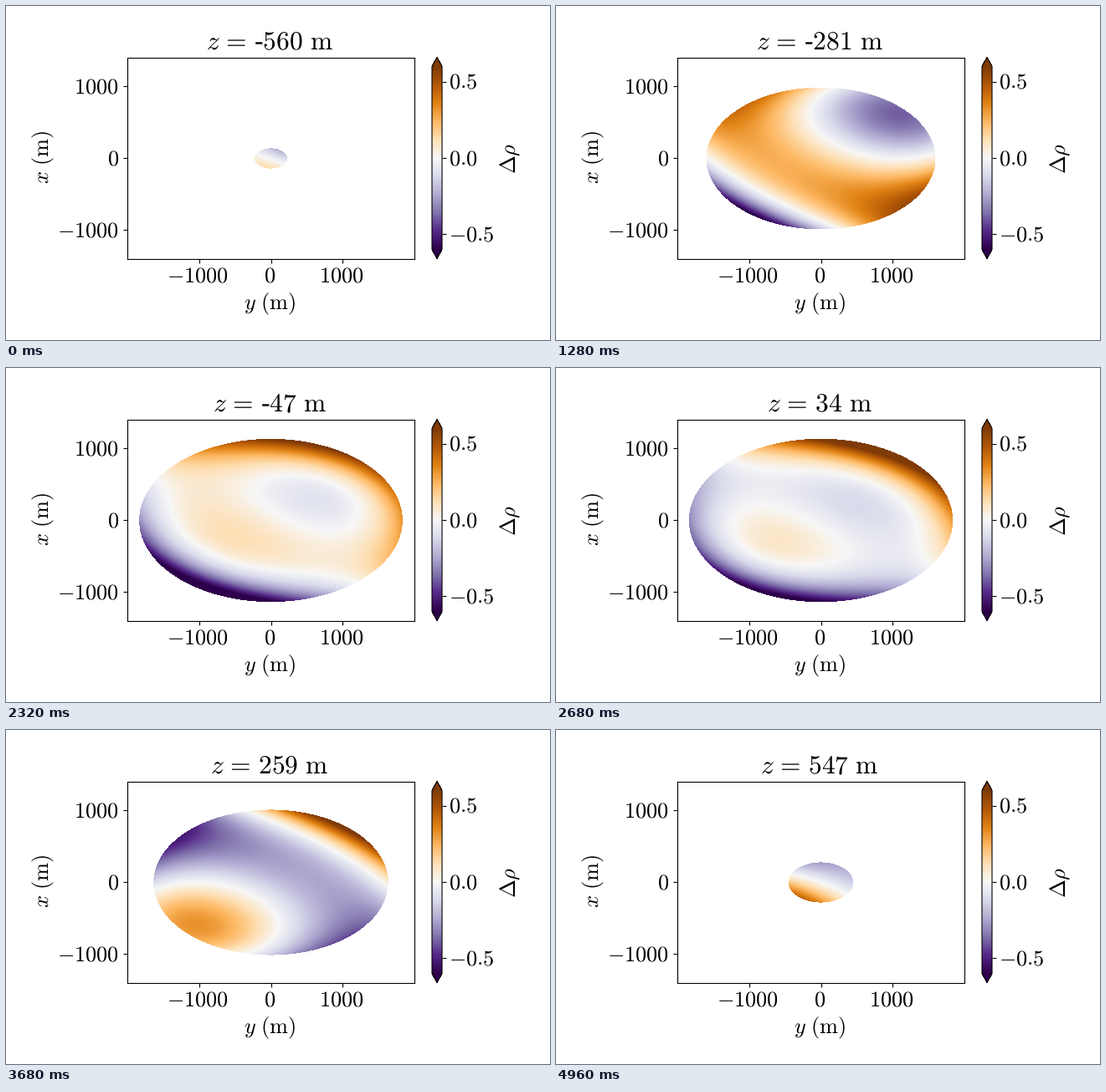
A matplotlib script for the animation above (5 s loop, 650 px wide and 400 px high).

```python
import numpy as np
import matplotlib.pyplot as plt
from matplotlib.animation import FuncAnimation

W, H, DPI = 650, 400, 100
FRAMES, INTERVAL = 125, 40
SMALL, LARGE = 18.95, 22.7
AX_BOX = (145.2, 61.8, 343, 241)      # left, top, width, height in pixels
CB_BOX = (509, 61.5, 12, 241)
Y_MAX, X_MAX, V_MAX = 2000, 1400, 0.6
SEMI_Y, SEMI_X, SEMI_Z = 1842, 1138, 564.3
CX, CY = 317, 182                     # stage position of the body's centre
PX_Y, PX_X = 343 / 4000, 241 / 2800   # pixels per metre

plt.rcParams.update({
    "mathtext.fontset": "cm",
    "font.family": "Liberation Serif",
    "text.hinting": "none",
    "axes.linewidth": 0.8,
})


def anomaly(y, x, z):
    """Odd cubic density anomaly in coordinates scaled by the semi-axes."""
    return (y * (-0.28 + 0.60 * y**2 + 0.85 * x**2 - 0.48 * z**2)
            + x * (-0.30 + 0.68 * y**2 + 0.95 * x**2 - 1.05 * z**2)
            + z * (-0.46 + 0.38 * y**2 + 0.58 * x**2 + 0.49 * z**2)
            + 2.65 * x * y * z)


NY, NX = AX_BOX[2:]
ys = ((np.arange(NY) + 0.5) / NY * 2 - 1) * Y_MAX / SEMI_Y
xs = (1 - (np.arange(NX) + 0.5) / NX * 2) * X_MAX / SEMI_X
GRID_Y, GRID_X = np.meshgrid(ys, xs)


def density(depth):
    z = depth / SEMI_Z
    inside = GRID_Y**2 + GRID_X**2 + z**2 <= 1
    return np.where(inside, anomaly(GRID_Y, GRID_X, z), np.nan)


def depth_at(i):
    return -569 + 9 * max(i, 1)


def title_text(depth):
    # the hyphen stays outside math mode so that it is not set as a minus
    sign = "$-$" if depth < 0 else ""
    return (r"$z\hspace{.13}=\hspace{.13}" + sign
            + rf"{abs(depth)}\ \mathrm{{m}}$")


fig = plt.figure(figsize=(W / DPI, H / DPI), dpi=DPI, facecolor="white")


def add_axes(box):
    left, top, w, h = box
    return fig.add_axes((left / W, 1 - (top + h) / H, w / W, h / H))


def label(x, y, s, size=SMALL, ha="center", rotation=0):
    return fig.text(x / W, 1 - y / H, s, fontsize=size, ha=ha, va="baseline",
                    rotation=rotation, rotation_mode="anchor")


ax = add_axes(AX_BOX)
image = ax.imshow(density(depth_at(0)), cmap="PuOr_r",
                  vmin=-V_MAX, vmax=V_MAX,
                  extent=(-Y_MAX, Y_MAX, -X_MAX, X_MAX), aspect="auto",
                  interpolation="nearest")
bar = fig.colorbar(image, cax=add_axes(CB_BOX), extend="both")

ticks = (-1000, 0, 1000)
ax.set_xticks(ticks, [""] * 3)
ax.set_yticks(ticks, [""] * 3)
for t in ticks:
    label(CX - 2.2 + t * PX_Y, 331.5, f"${t}$")
    label(134.8, CY + 9 - t * PX_X, f"${t}$", ha="right")

bar_ticks = (-0.5, 0.0, 0.5)
bar.set_ticks(bar_ticks, labels=[""] * 3)
for t in bar_ticks:
    label(529, CY + 9 - t * 182.6, f"${t}$", ha="left")
for a in (ax, bar.ax):
    a.tick_params(length=3.6, width=0.8)

label(315.5, 363.5, r"$y\ \mathrm{(m)}$")
label(51.5, CY - 0.8, r"$x\ \mathrm{(m)}$", rotation=90)
label(609, CY, r"$\Delta\rho$", rotation=90)
title = label(314.8, 52, title_text(depth_at(0)), size=LARGE)


def update(i):
    depth = depth_at(i)
    image.set_data(density(depth))
    title.set_text(title_text(depth))
    return image, title


anim = FuncAnimation(fig, update, frames=FRAMES, interval=INTERVAL,
                     repeat=True, blit=False)
plt.show()
```
